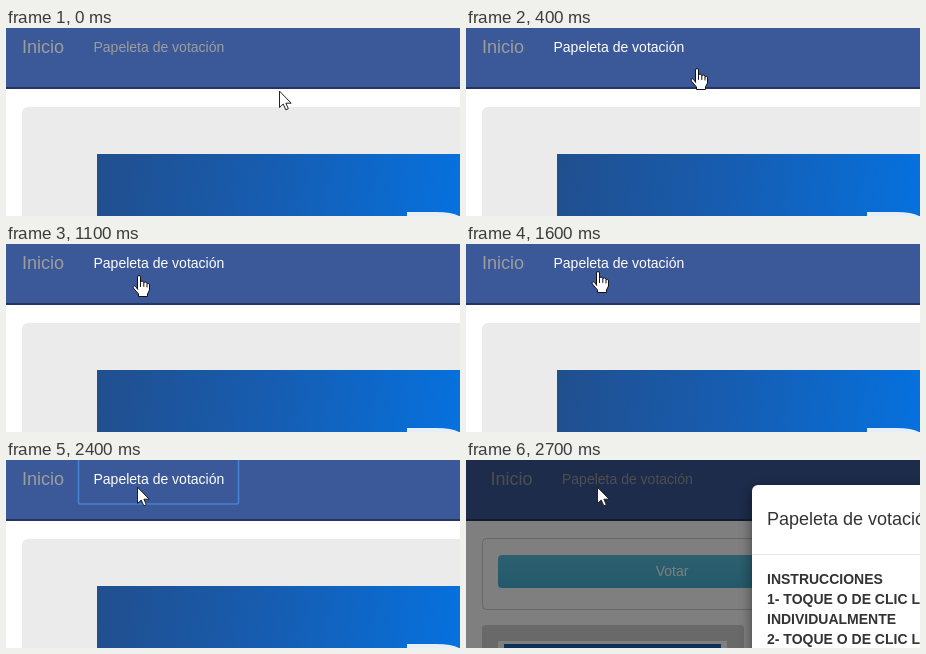
Write an HTML page that moves like this. It is 454 by 188 pixels and loops after 2800 ms.

```html
<!DOCTYPE html>
<html lang="es">
<head>
<meta charset="utf-8">
<style>
  html, body { margin: 0; width: 100%; height: 100%; overflow: hidden; background: #fff; }
  svg { display: block; width: 454px; height: 188px; }
  text { font: 14px "Liberation Sans", Arial, sans-serif; white-space: pre; }
  .big { font-size: 18px; }
  .bold { font-weight: bold; }
  .nav { fill: #9d9d9d; }
  .nav.hover { fill: #fff; }
  .cursor { stroke-linejoin: round; stroke-linecap: round; }
</style>
</head>
<body>
<svg viewBox="0 0 454 188">
  <defs>
    <linearGradient id="banner" gradientUnits="userSpaceOnUse" x1="91" y1="140" x2="454" y2="180">
      <stop offset="0" stop-color="#214f8e"/>
      <stop offset=".45" stop-color="#175caf"/>
      <stop offset="1" stop-color="#0671de"/>
    </linearGradient>
    <linearGradient id="button" x2="0" y2="1">
      <stop offset="0" stop-color="#5bc0de"/>
      <stop offset="1" stop-color="#46b5d8"/>
    </linearGradient>
    <filter id="shade" x="-20%" y="-20%" width="140%" height="140%">
      <feDropShadow dx="0" dy="5" stdDeviation="7" flood-opacity=".5"/>
    </filter>
    <g id="bar">
      <rect width="454" height="60" fill="#3b5998"/>
      <rect y="59" width="454" height="2" fill="#24365f"/>
    </g>
  </defs>

  <g id="home">
    <rect width="454" height="188" fill="#fff"/>
    <use href="#bar"/>
    <text class="nav big" x="16" y="25">Inicio</text>
    <text id="link" class="nav" x="87.5" y="24">Papeleta de votación</text>
    <rect id="focus" x="72.5" y="-1.5" width="160" height="45.5" rx="1.5" fill="none" stroke="#4680d2" stroke-width="1.6"/>
    <rect x="16" y="79" width="460" height="130" rx="6" fill="#ebebeb"/>
    <rect x="91" y="126" width="363" height="62" fill="url(#banner)"/>
    <path d="M401 184H430Q446 184 453 188H401Z" fill="#e6eefa"/>
  </g>

  <g id="ballot">
    <rect width="454" height="188" fill="#fff"/>
    <use href="#bar"/>
    <text class="nav big" x="24.5" y="25">Inicio</text>
    <text class="nav" x="96" y="24">Papeleta de votación</text>
    <rect x="16.5" y="78.5" width="380" height="71" rx="4" fill="#fff" stroke="#d2d2d2"/>
    <rect x="32" y="95" width="348" height="33" rx="4" fill="url(#button)"/>
    <text x="206" y="116" text-anchor="middle" fill="#fff">Votar</text>
    <rect x="16" y="165" width="262" height="40" rx="4" fill="#d3d3d3"/>
    <rect x="32" y="181" width="229" height="20" fill="#fff"/>
    <rect x="38" y="184" width="217" height="20" fill="#1c5fae"/>
    <rect width="454" height="188" opacity=".5"/>
    <rect x="286" y="25" width="300" height="260" rx="6" fill="#fff" filter="url(#shade)"/>
    <path d="M286 94.5H454" stroke="#e5e5e5"/>
    <g fill="#333">
      <text class="big" x="301" y="65">Papeleta de votación</text>
      <text class="bold" x="301" y="124">INSTRUCCIONES</text>
      <text class="bold" x="301" y="144">1- TOQUE O DE CLIC LA</text>
      <text class="bold" x="301" y="164">INDIVIDUALMENTE</text>
      <text class="bold" x="301" y="184">2- TOQUE O DE CLIC LA</text>
    </g>
  </g>

  <g id="pointer" class="cursor">
    <path id="arrow" d="M.5 .5V16.5L4.2 13L6.8 18.8L9.3 17.7L6.9 12.2H11.8Z" fill="#fff" stroke="#222"/>
    <g id="hand" fill="#fff" stroke="#111">
      <path d="M-.5 14V2Q-.5 .5 1 .5T2.5 2V7.5Q2.7 6 4 6T5.8 7.5V8.2Q6 7 7.4 7T9 8.5V9.2Q9.3 8.2 10.4 8.4T11.5 10V15L9.5 19V21.5H.5V19L-4.8 12.8Q-5.3 11 -3.7 10.8Q-2.6 10.8 -.5 14Z"/>
      <path d="M2.5 8V11.5M5.8 8.5V11.5M9 9.5V12" fill="none"/>
    </g>
  </g>
</svg>
<script>
  const LOOP = 2800, STEP = 100;
  const HOVER = 400, PRESS = 1900, WAIT = 2100, LOADED = 2600;

  // time, x, y of the pointer tip
  const path = [
    [0, 273, 63], [100, 270, 61], [200, 261, 56], [300, 247, 48],
    [400, 230, 40], [600, 192, 35], [800, 158, 32], [1000, 136, 31],
    [1100, 132, 31], [1400, 132, 31], [1600, 131, 26.5], [LOOP, 131, 26.5]
  ];

  const $ = id => document.getElementById(id);
  const show = (id, on) => $(id).style.display = on ? '' : 'none';

  function tipAt(t) {
    const i = path.findIndex(p => p[0] > t);
    const [a, b] = [path[i - 1], path[i]];
    const k = (t - a[0]) / (b[0] - a[0]);
    return [1, 2].map(n => Math.round(a[n] + (b[n] - a[n]) * k));
  }

  function draw(now) {
    const t = Math.floor(now % LOOP / STEP) * STEP;
    const hand = t >= HOVER && t < WAIT;
    show('home', t < LOADED);
    show('ballot', t >= LOADED);
    show('focus', t >= PRESS);
    show('hand', hand);
    show('arrow', !hand);
    $('link').classList.toggle('hover', t >= HOVER);
    $('pointer').setAttribute('transform', `translate(${tipAt(t)})`);
  }

  const start = performance.now();
  function tick() {
    draw(performance.now() - start);
    requestAnimationFrame(tick);
  }
  tick();
</script>
</body>
</html>
```
